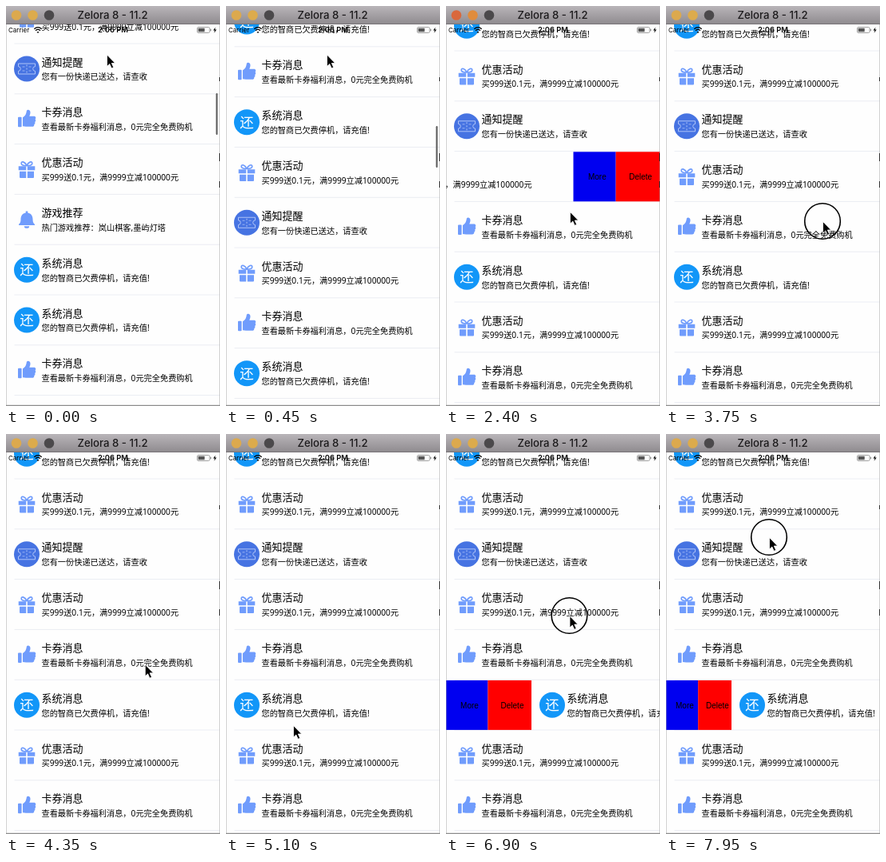
Write an HTML page that moves like this. It is 268 px wide and 500 px high and loops after 8 s.

```html
<!DOCTYPE html>
<html lang="zh-CN">
<head>
<meta charset="utf-8">
<title>Swipe list</title>
<style>
html, body { margin: 0; width: 100%; height: 100%; overflow: hidden; background: #fff; }
svg { display: block; width: 268px; height: 500px; }
text { font-family: 'Noto Sans', 'Noto Sans CJK SC', 'Noto Sans CJK', sans-serif; fill: #000; }
.title { font-size: 13px; }
.sub { font-size: 10.2px; }
.seal { font-size: 17.5px; fill: #fff; text-anchor: middle; font-weight: 300; }
.bar { font: 500 13.2px Inter, sans-serif; text-anchor: middle; fill: #1c1a1c; }
.status { font: 8px Inter, sans-serif; }
.clock { font: 600 9.4px Inter, sans-serif; text-anchor: middle; }
.action { font: 10px 'Liberation Sans', Arial, sans-serif; text-anchor: middle; }
</style>
</head>
<body>
<svg viewBox="0 0 268 500">
  <defs>
    <linearGradient id="chrome" x2="0" y2="1">
      <stop offset="0" stop-color="#b9b5b9"/>
      <stop offset="1" stop-color="#8f8b8f"/>
    </linearGradient>
    <clipPath id="screen"><rect y="23" width="268" height="475.5"/></clipPath>

    <!-- icons are centred on 0,0 -->
    <g id="ticket">
      <circle r="16" fill="#4673e2"/>
      <g fill="none" stroke="#b9ccfa" stroke-width=".9">
        <path d="M-10.500-6.500h21v3.700a2.800 2.800 0 0 0 0 5.600v3.700h-21V2.800a2.800 2.800 0 0 0 0-5.600z"/>
        <path d="M0-5v10" stroke-dasharray="2 2"/>
        <path d="M-5.500-2.500h3M-5.500 2.500h3M2.500-2.500h3M2.500 2.500h3" stroke-width=".7"/>
      </g>
    </g>
    <g id="thumb" fill="#709cfc">
      <rect x="-11" y="-2.500" width="4.600" height="12.500" rx="1"/>
      <path d="M-5-2C-1.500-4-.6-7-.2-10c.2-2.200 4.600-2.200 4.700 1.500 0 2-.6 3.500-1.200 5H9c2.600 0 2.800 2.600 1.600 3.700 1 1.200.8 2.600-.4 3.400.6 1.300.2 2.400-.9 3 .2 1.700-.6 2.900-2.500 2.900H-1L-5 9z"/>
    </g>
    <g id="gift" fill="#709cfc">
      <path d="M-10.300-3.800h9.500v5h-9.500zM.8-3.800h9.500v5H.8zM-9 2.700h8.200V11H-8q-1 0-1-1zM.8 2.700H9V10q0 1-1 1H.8z"/>
      <path d="M0-4.500C-2-9.500-6.500-10.500-6.800-7.500-7-5.200-4-4.500 0-4.500zM0-4.500C2-9.500 6.500-10.500 6.800-7.500 7-5.200 4-4.500 0-4.500z" fill="none" stroke="#709cfc" stroke-width="1.700"/>
    </g>
    <g id="bell" fill="#709cfc">
      <path d="M-1.300-10.500h2.600v2C5.500-7.700 7.500-4.500 7.500-.5c0 3.500.8 5 2.500 6.500v1.200h-20V6c1.700-1.500 2.500-3 2.500-6.500 0-4 2-7.200 6.200-8z"/>
      <path d="M-3.200 8.300h6.400a3.200 2.600 0 0 1-6.400 0z"/>
    </g>
    <g id="seal">
      <circle r="16" fill="#1296f8"/>
      <text class="seal" y="6.500">还</text>
    </g>
  </defs>

  <rect width="268" height="500" fill="#fefefe"/>
  <g clip-path="url(#screen)">
    <g id="list"></g>
    <rect id="thumbBar" x="262.800" width="2.400" height="52" rx="1.200" fill="#707070"/>
  </g>

  <text class="status" x="3" y="33">Carrier</text>
  <g fill="none" stroke="#000" stroke-width="1.300">
    <path d="M35.300 28.700q4.700-4.200 9.400 0M37 30.700q3-2.600 6 0"/>
    <path d="M39 32.500h2l-1 1.200z" fill="#000" stroke-width=".6"/>
  </g>
  <text class="clock" x="134" y="33.300">2:06 PM</text>
  <rect x="239.500" y="26.500" width="15.500" height="7" rx="1.500" fill="none" stroke="#8a8a8a" stroke-width=".8"/>
  <rect x="240.700" y="27.700" width="8" height="4.600" rx=".5" fill="#555"/>
  <rect x="255.800" y="28.700" width="1.200" height="2.600" fill="#8a8a8a"/>
  <path d="M262.500 26.500l-3 4h2l-.8 3.200 3-4.200h-2z"/>

  <rect width="268" height="22.500" fill="url(#chrome)"/>
  <rect y="22" width="268" height="1" fill="#777377"/>
  <circle id="light1" cx="13" cy="11.500" r="6.300"/>
  <circle id="light2" cx="33.500" cy="11.500" r="6.300"/>
  <circle cx="54" cy="11.500" r="6.300" fill="#4b494b"/>
  <text class="bar" x="133.500" y="16">Zelora 8 - 11.2</text>

  <path d="M.3 23v476M267.700 23v476" stroke="#a5a5a5" stroke-width=".6"/>
  <path d="M267.500 89v5M267.500 184v10M267.500 219v8" stroke="#333"/>
  <path d="M0 499.300h268" stroke="#8d8d8d" stroke-width="1.300"/>

  <g id="pointer">
    <circle id="ring" r="22.300" fill="none" stroke="#000" stroke-width="1.600"/>
    <path d="M.5 .5v14.500l3.300-3 2.400 5.300 2.500-1.100-2.400-5.200h4.400z" stroke="#fff" stroke-width=".8"/>
  </g>
</svg>

<script>
const LOOP = 8000, STEP = 150;
const WIDTH = 268, ROW = 62.8, FIRST = -15.6, SCROLL = 493.4;
const $ = id => document.getElementById(id);

const kinds = {
  notice: ['ticket', '通知提醒', '您有一份快递已送达，请查收'],
  coupon: ['thumb', '卡券消息', '查看最新卡券福利消息，0元完全免费购机'],
  offer: ['gift', '优惠活动', '买999送0.1元，满9999立减100000元'],
  game: ['bell', '游戏推荐', '热门游戏推荐：岚山棋客,墨屿灯塔'],
  system: ['seal', '系统消息', '您的智商已欠费停机，请充值!']
};
const order = ('offer notice coupon offer game system system coupon ' +
  'system offer notice offer coupon system offer coupon').split(' ');

// tracks: [time, value, ...]
const pointerTrack = [
  [0, 126, 60.5], [600, 126, 60.5], [1350, 233, 217], [1500, 233, 217],
  [2250, 155, 252], [2400, 155, 257], [2850, 88, 222], [3000, 88, 222],
  [3750, 196, 269], [4050, 196, 269], [5100, 84, 364], [5400, 47, 340],
  [6150, 154, 332], [6900, 154.5, 227], [7950, 129, 129]
];
const swipes = {
  11: [[0, 0], [1500, 0], [2250, -78], [2400, -108.5], [3000, -108.5], [3750, 0]],
  13: [[0, 0], [5400, 0], [6150, 107], [6900, 107], [7950, 82]]
};
const presses = [[1500, 2250], [3000, 3900], [5400, LOOP]];

function sample(track, t) {
  const next = track.findIndex(k => k[0] > t);
  if (next < 0) return track[track.length - 1].slice(1);
  const a = track[next - 1], b = track[next];
  const p = (t - a[0]) / (b[0] - a[0]), e = p * p * (3 - 2 * p);
  return a.slice(1).map((v, i) => v + (b[i + 1] - v) * e);
}
const within = (t, spans) => spans.some(([a, b]) => t >= a && t < b);

const action = (label, color) =>
  `<g><rect y=".5" height="62" fill="${color}"/><text class="action" y="35.600">${label}</text></g>`;

$('list').innerHTML = order.map((name, i) => {
  const [icon, title, sub] = kinds[name];
  return `<g transform="translate(0 ${FIRST + i * ROW})">
    <g id="cell${i}">
      <use href="#${icon}" x="26" y="31.300"/>
      <text class="title" x="44.500" y="27.400">${title}</text>
      <text class="sub" x="44.500" y="45.200">${sub}</text>
    </g>
    <path d="M10.500 62.600H268" stroke="#e6e9f0" stroke-width=".8"/>
    ${swipes[i] ? `<g id="actions${i}">${action('More', '#0000f0')}${action('Delete', '#ff0000')}</g>` : ''}
  </g>`;
}).join('');

function swipe(i, offset) {
  const w = Math.abs(offset), left = offset < 0 ? WIDTH - w : 0;
  $('cell' + i).setAttribute('transform', `translate(${offset} 0)`);
  const group = $('actions' + i);
  group.style.display = w > 0.4 ? '' : 'none';
  const edges = [0, 0.49, 1].map(f => left + f * w);
  [...group.children].forEach((button, n) => {
    const [box, label] = button.children;
    box.setAttribute('x', edges[n]);
    box.setAttribute('width', edges[n + 1] - edges[n]);
    label.setAttribute('x', (edges[n] + edges[n + 1]) / 2 + 3.3);
  });
}

function draw(t) {
  const p = Math.min(1, t / 1200), scroll = SCROLL * (1 - (1 - p) ** 3);
  $('list').setAttribute('transform', `translate(0 ${-scroll})`);
  $('thumbBar').setAttribute('y', 109 + scroll * 0.11);
  $('thumbBar').setAttribute('opacity', Math.max(0, Math.min(1, (1400 - t) / 350)));

  for (const i in swipes) swipe(i, sample(swipes[i], t)[0]);

  const [x, y] = sample(pointerTrack, t);
  $('pointer').setAttribute('transform', `translate(${x} ${y})`);
  $('ring').style.display = within(t, presses) ? '' : 'none';

  const warm = within(t, [[2250, 3150]]);
  $('light1').setAttribute('fill', warm ? '#d9683c' : '#dca94e');
  $('light2').setAttribute('fill', warm ? '#e08c3c' : '#dcab4c');
}

const start = performance.now();
function tick() {
  const t = (performance.now() - start) % LOOP;
  draw(Math.floor(t / STEP) * STEP);
  requestAnimationFrame(tick);
}
draw(0);
requestAnimationFrame(tick);
</script>
</body>
</html>
```
